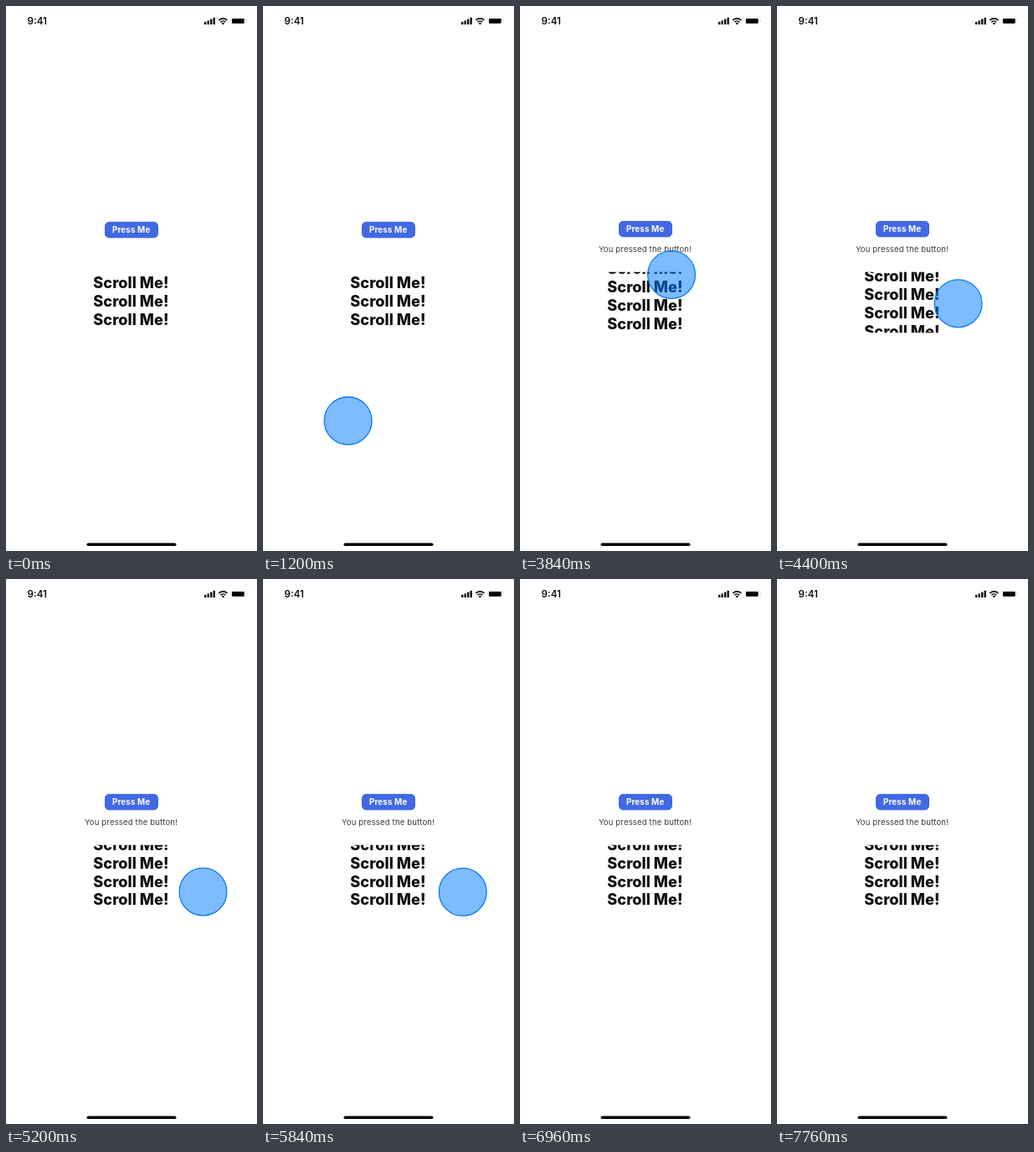
An HTML page that plays this animation: 300x649 px, repeating every 9680 ms.

```html
<!DOCTYPE html>
<html lang="en">
<head>
<meta charset="utf-8">
<title>Press and scroll</title>
<style>
  html, body { margin: 0; width: 100%; height: 100%; overflow: hidden; background: #fff; }
  svg { display: block; width: 300px; height: 649px; font-family: Inter, sans-serif; }
  text { text-anchor: middle; }
</style>
</head>
<body>
<svg viewBox="0 0 300 649">
  <defs>
    <clipPath id="view"><rect x="90" y="315.8" width="120" height="72.2"/></clipPath>
  </defs>
  <rect width="300" height="649" fill="#fff"/>

  <text x="37.3" y="22.1" font-size="11.6" font-weight="600" fill="#111">9:41</text>
  <g fill="#111">
    <rect x="237" y="18.8" width="2.4" height="3.2" rx=".6"/>
    <rect x="240.5" y="17.3" width="2.4" height="4.7" rx=".6"/>
    <rect x="244" y="15.6" width="2.4" height="6.4" rx=".6"/>
    <rect x="247.5" y="13.8" width="2.4" height="8.2" rx=".6"/>
  </g>
  <g fill="none" stroke="#111" stroke-width="1.6">
    <path d="M254.3 17a7.2 7.2 0 0 1 10.2 0"/>
    <path d="M256.4 19.2a4.3 4.3 0 0 1 6 0"/>
  </g>
  <path d="M259.4 22.4l-1.8-1.8a2.6 2.6 0 0 1 3.6 0z" fill="#111"/>
  <rect x="269" y="13.8" width="17" height="8" rx="2.2" fill="none" stroke="#111" stroke-opacity=".15" stroke-width=".8"/>
  <rect x="270" y="15" width="14.7" height="5.8" rx="1.2" fill="#000"/>
  <path d="M287 16.4q1.2 1.4 0 2.9z" fill="#111" fill-opacity=".4"/>

  <g id="button">
    <rect x="118.5" y="257.4" width="63" height="18.4" rx="4.7" fill="#4169e4" stroke="#2f5fdc" stroke-width=".9"/>
    <text x="149.7" y="270.2" font-size="9.9" font-weight="700" letter-spacing=".12" fill="#fff">Press Me</text>
  </g>
  <text id="note" x="149.5" y="292.5" font-size="9.6" letter-spacing=".13" fill="#3c3c3c">You pressed the button!</text>
  <g id="pane">
    <g clip-path="url(#view)">
      <g id="list" font-size="18.2" font-weight="800" fill="#111"></g>
    </g>
  </g>
  <rect x="96.5" y="639.5" width="107" height="3.6" rx="1.8" fill="#000"/>
  <circle id="touch" r="28.4" fill="#007aff" fill-opacity=".5" stroke="#0a78f4" stroke-width="1.3"/>
</svg>
<script>
const LOOP = 9680, ROW = 21.8, PRESS = 2600;
const $ = id => document.getElementById(id);
const button = $("button"), note = $("note"), pane = $("pane"), list = $("list"), touch = $("touch");

for (let i = -1; i < 4; i++) {
  const row = document.createElementNS("http://www.w3.org/2000/svg", "text");
  row.setAttribute("x", 149.4);
  row.setAttribute("y", 336.2 + i * ROW);
  row.textContent = "Scroll Me!";
  list.append(row);
}

const span = (t, a, b) => Math.min(1, Math.max(0, (t - a) / (b - a)));
const inOut = p => p < .5 ? 2 * p * p : 1 - 2 * (1 - p) ** 2;
const drag = t => inOut(span(t, 3560, 4960));
const shiftY = (el, y) => el.setAttribute("transform", `translate(0 ${y})`);

// Each move: start, end, easing, destination
const moves = [
  [840, 1760, inOut, 153, 269],
  [2540, 2960, inOut, 176.4, 315.4],
  [3560, 4960, inOut, 235.5, 372.5],
  [5160, 6520, p => p ** 5, 340, 382]
];

function touchAt(t) {
  let x = 79, y = 593.2;
  for (const [a, b, ease, tx, ty] of moves) {
    const p = ease(span(t, a, b));
    x += (tx - x) * p;
    y += (ty - y) * p;
  }
  return [x, y];
}

function draw(t) {
  // The note makes the centred column taller, so its ends move apart
  const grow = t >= PRESS ? 1 : 0;
  shiftY(button, -grow);
  shiftY(pane, grow);
  shiftY(list, 51.3 * drag(t) % ROW);
  note.setAttribute("visibility", grow ? "visible" : "hidden");

  const [x, y] = touchAt(t);
  touch.setAttribute("cx", x);
  touch.setAttribute("cy", y);
  touch.setAttribute("opacity", span(t, 840, 1000));
  touch.setAttribute("visibility", t >= 840 && t < 6520 ? "visible" : "hidden");
}

let begin;
function tick(now) {
  begin ??= now;
  draw((now - begin) % LOOP);
  requestAnimationFrame(tick);
}
draw(0);
requestAnimationFrame(tick);
</script>
</body>
</html>
```
